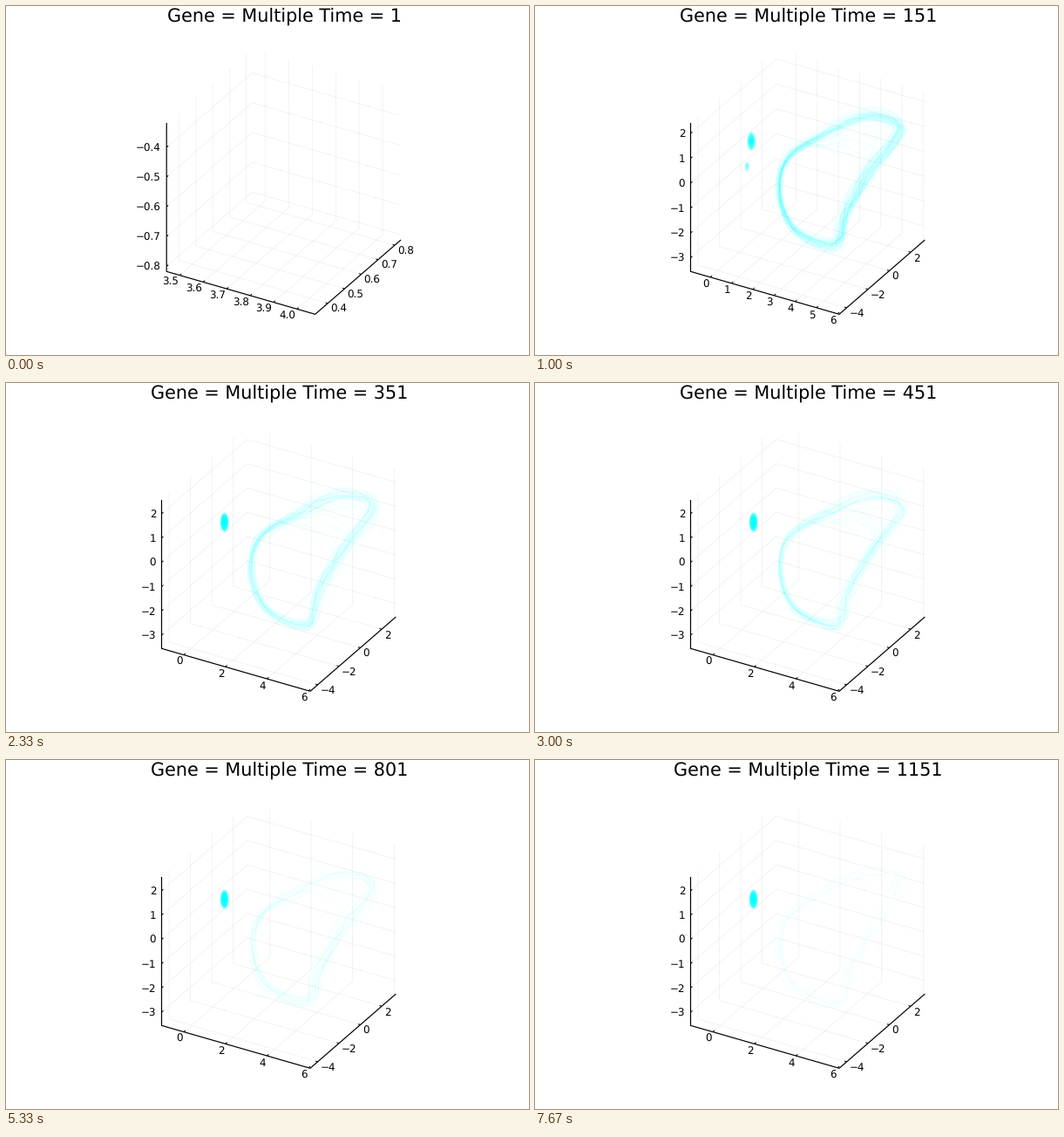
A matplotlib script for the animation above (8 s loop, 600 by 400 pixels).

```python
import numpy as np
import matplotlib.pyplot as plt
from matplotlib.animation import FuncAnimation
from matplotlib.collections import LineCollection
from matplotlib.patches import Polygon

DPI = 100
PX = 72 / DPI
LOOP_MS = 8000
TICK_MS = 50
STEPS = 24

# Screen vectors of the three edges of the box
EX = np.array([170.5, 49.0])
EY = np.array([98.3, -85.2])
EZ = np.array([0.0, -170.3])

# Key points of the orbit, from the far tip over the top and round the left
ORBIT = [(421, 143), (385, 129), (335, 149), (291, 178), (282, 220),
         (301, 261), (347, 277), (358, 240), (388, 190)]

plt.rcParams.update({"font.family": "DejaVu Sans", "text.hinting": "none"})
fig = plt.figure(figsize=(600 / DPI, 400 / DPI), dpi=DPI, facecolor="white")
ax = fig.add_axes([0, 0, 1, 1])


def axis_limits(step):
    if step == 0:
        return (3.4437, 4.0775), (.3245, .836), (-.8175, -.318)
    x_min = -.93 if step < 7 else -1.07
    x_max = min(6.08, 5.4 + .35 * step)
    z_max = 2.195 + .075 * min(step, 5)
    return (x_min, x_max), (-4.7, 3.33), (-3.55, z_max)


def axis_ticks(low, high):
    """Positions along the axis from 0 to 1, with their labels."""
    span = high - low
    gap = .1 if span < 1 else 1 if span < 7.1 else 2
    for k in range(int(np.ceil(low / gap)), int(np.floor(high / gap)) + 1):
        text = f"{k * gap:.1f}" if gap < 1 else str(k * gap)
        yield (k * gap - low) / span, text.replace("-", "\u2212")


def origin(step):
    return np.array([184.2 if step == 0 else 178.5, 304.3])


def project(step, point):
    u, v, w = ((p - low) / (high - low)
               for p, (low, high) in zip(point, axis_limits(step)))
    return origin(step) + u * EX + v * EY + w * EZ


def axes_shift(step, point):
    return project(step, point) - project(STEPS - 1, point)


def catmull_rom(points, count=14):
    points = np.array(points, float)
    t = np.linspace(0, 1, count, endpoint=False)[None, :, None]
    a, b, c, d = (np.roll(points, k, axis=0)[:, None] for k in (1, 0, -1, -2))
    curve = b + .5 * t * (c - a + t * (2*a - 5*b + 4*c - d + t * (3*(b - c) + d - a)))
    return curve.reshape(-1, 2)


def add_lines(lines, color, width):
    ax.add_collection(LineCollection(lines, colors=color, linewidths=width * PX))


def draw_axis(limits, start, edge, wall, far_edge, tick, offset, ha):
    """Grid lines follow `wall` and `far_edge` from each tick position."""
    grid, ticks = [], []
    for u, text in axis_ticks(*limits):
        p = start + u * edge
        base = p - tick["back"]
        grid.append([base + corner for corner in (wall, far_edge[0], far_edge[1])])
        ticks.append([p, p + tick["mark"]])
        ax.text(p[0] + offset[0], p[1] + offset[1] + 4.3, text, ha=ha,
                va="baseline", fontsize=11.9 * PX)
    add_lines(grid, (0, 0, 0, .06), .8)
    add_lines(ticks, "black", 1)


def draw_box(step):
    o, none = origin(step), np.zeros(2)
    x, y, z = axis_limits(step)
    outward = {"back": none, "mark": .02 * EY}
    draw_axis(x, o, EX, none, (EY, EY + EZ), outward, (-1.5, 7.3), "right")
    draw_axis(y, o + EX, EY, EX, (none, EZ), {"back": EX, "mark": -.015 * EX},
              (3, 6), "left")
    draw_axis(z, o, EZ, none, (EY, EY + EX), outward, (-6.3, .1), "right")
    add_lines([[o + EZ, o, o + EX, o + EX + EY]], "black", 1.2)
    ax.text(o[0] + (EX[0] + EY[0]) / 2 + .4, 19,
            f"Gene = Multiple Time = {1 + 50 * step}",
            ha="center", va="baseline", fontsize=20.8 * PX)


def draw_trails(step):
    rng = np.random.default_rng(40 + step)
    orbit = catmull_rom(ORBIT)
    size = len(orbit)
    phase = 2 * np.pi * np.arange(size) / size
    x, y = orbit.T
    # Some paths turn back before the tip; all of them gather on the left
    shortcut = np.clip((x - y - 150) / 128, 0, 1)[:, None] * [-45, 45]
    spread = 2 + 1.9 * np.clip((x - 285) / 70, 0, 1)
    orbit = orbit + axes_shift(step, (3, 0, 0))
    trails = []
    for _ in range(round(130 * np.exp(-(step - 3) / 8))):
        early_turn = rng.uniform(.2, 1.1) if rng.random() < .25 else 0
        wobble = rng.normal(0, .65, (2, 1)) + sum(
            rng.normal(0, .9 / k ** .5, (2, 1))
            * np.sin(k * phase + rng.uniform(0, 2 * np.pi, (2, 1)))
            for k in (1, 2, 5, 9))
        path = orbit + early_turn * shortcut + (wobble * spread).T
        length = int(size * rng.uniform(.4, .95))
        trails.append(path[(rng.integers(size) + np.arange(length)) % size])
    add_lines(trails, (0, 1, 1, .042), .85)


def draw_cluster(centre, width, height, alpha, power):
    angle = np.linspace(0, 2 * np.pi, 60)
    c, s = np.cos(angle), np.sin(angle)
    outline = np.column_stack([np.sign(c) * abs(c) ** power * width,
                               np.sign(s) * abs(s) ** power * height])
    for scale in np.linspace(1, .3, 9):
        ax.add_patch(Polygon(centre + scale * outline, facecolor=(0, 1, 1, alpha),
                             edgecolor="none"))


def draw_clusters(step):
    shift = axes_shift(step, (1, 0, 2))
    growth = min(1, (step - 1) / 3)
    draw_cluster(np.array([250.6, 159.6]) + shift, 5, 11.2, .36 * growth,
                 1.6 - .6 * growth)
    # The side cluster comes and goes every eight steps
    pulse = max(0, np.cos(2 * np.pi * (step - 3) / 8)) ** 3
    draw_cluster(np.array([245.7, 188.5]) + shift, 3, 6.5, .08 * pulse, 1.1)


def draw_step(step):
    ax.clear()
    ax.set(xlim=(0, 600), ylim=(400, 0))
    ax.axis("off")
    draw_box(step)
    if step:
        draw_trails(step)
        draw_clusters(step)


def step_at(frame):
    # The lead makes a change fall on the last tick before it is due
    lead = 34
    return int((frame * TICK_MS + lead) * STEPS / LOOP_MS)


def update(frame):
    if frame == 0 or step_at(frame) != step_at(frame - 1):
        draw_step(step_at(frame))


anim = FuncAnimation(fig, update, frames=LOOP_MS // TICK_MS, interval=TICK_MS,
                     init_func=lambda: draw_step(0), repeat=True, repeat_delay=0)
plt.show()
```
